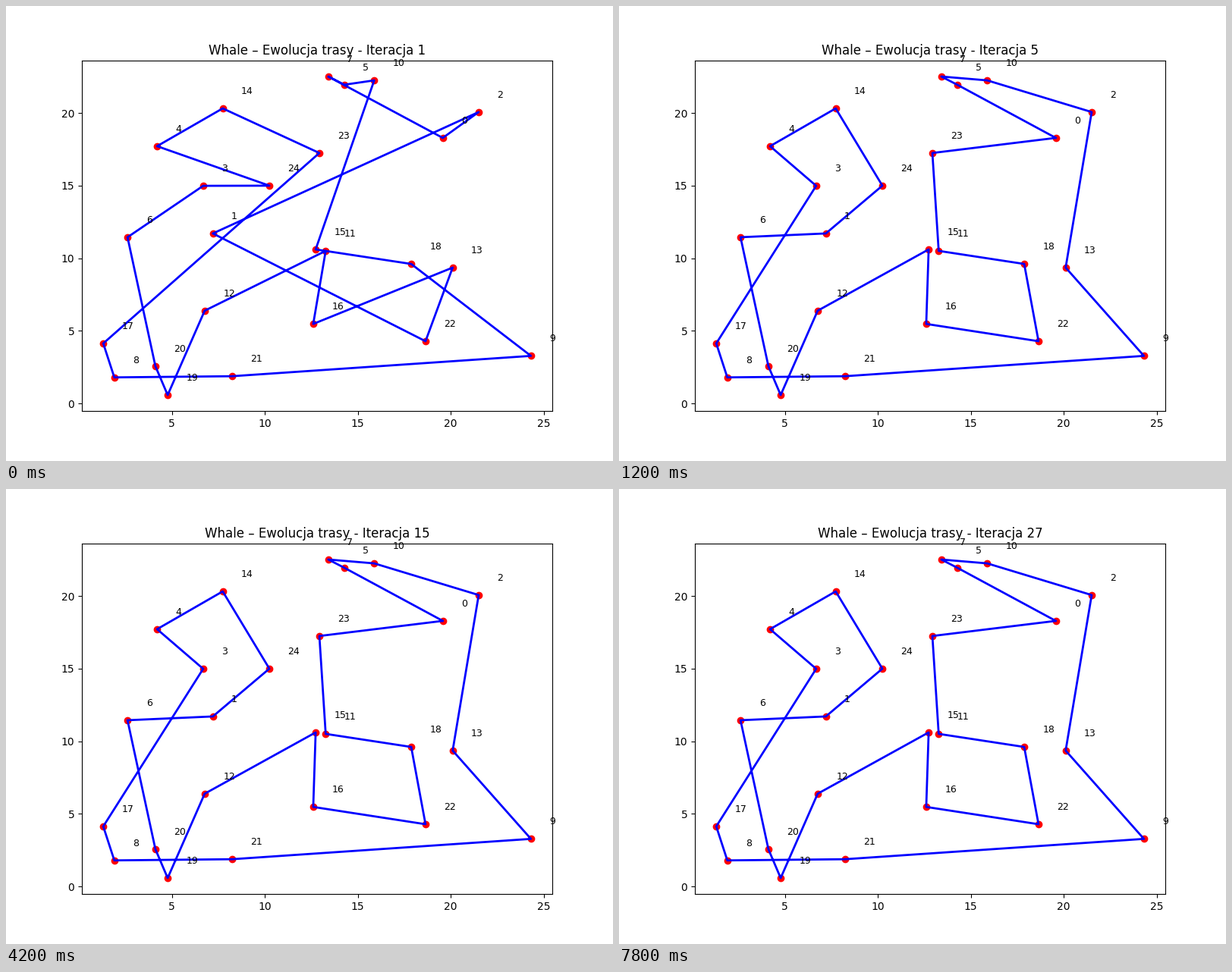
A matplotlib script that plays this animation: 800 by 600 pixels, repeating every 8000 ms.

```python
import matplotlib.pyplot as plt
from matplotlib.animation import FuncAnimation

TICK_MS = 100
LOOP_MS = 8000
ITERATION_MS = 300

# City number -> position; the order of entry is the opening tour
CITIES = {
    0: (19.57, 18.29), 2: (21.50, 20.07), 1: (7.20, 11.71), 22: (18.64, 4.29),
    13: (20.10, 9.36), 16: (12.60, 5.48), 11: (13.27, 10.51), 12: (6.76, 6.39),
    19: (4.77, 0.585), 20: (4.11, 2.57), 6: (2.61, 11.45), 3: (6.68, 14.99),
    24: (10.24, 15.00), 4: (4.20, 17.72), 14: (7.73, 20.32), 23: (12.93, 17.25),
    17: (1.305, 4.14), 8: (1.90, 1.80), 21: (8.23, 1.88), 9: (24.31, 3.28),
    18: (17.87, 9.61), 15: (12.73, 10.61), 10: (15.88, 22.25), 5: (14.27, 21.95),
    7: (13.41, 22.515),
}

# Each iteration improves the tour by exchanging pairs of cities
SWAPS = {
    2: [(1, 23), (4, 14), (13, 22)],
    3: [(13, 18), (15, 23)],
    4: [(2, 23), (1, 3)],
    5: [(11, 15), (5, 7)],
}


def tour_at(iteration):
    tour = list(CITIES)
    for step in range(2, iteration + 1):
        for a, b in SWAPS.get(step, []):
            i, j = tour.index(a), tour.index(b)
            tour[i], tour[j] = b, a
    return tour


def closed_path(tour):
    return zip(*(CITIES[city] for city in tour + tour[:1]))


fig, ax = plt.subplots(figsize=(8, 6), dpi=100)
ax.scatter(*zip(*CITIES.values()), c="red")
route, = ax.plot(*closed_path(tour_at(1)), "b-", linewidth=2,
                 solid_capstyle="round")
for city, (x, y) in CITIES.items():
    ax.text(x + 1, y + 1, str(city), fontsize=9)
title = ax.set_title("")


def update(tick):
    iteration = tick * TICK_MS // ITERATION_MS + 1
    xs, ys = closed_path(tour_at(iteration))
    route.set_data(xs, ys)
    title.set_text(f"Whale – Ewolucja trasy - Iteracja {iteration}")
    return route, title


anim = FuncAnimation(fig, update, frames=LOOP_MS // TICK_MS,
                     interval=TICK_MS, repeat=True, repeat_delay=0)
plt.show()
```
